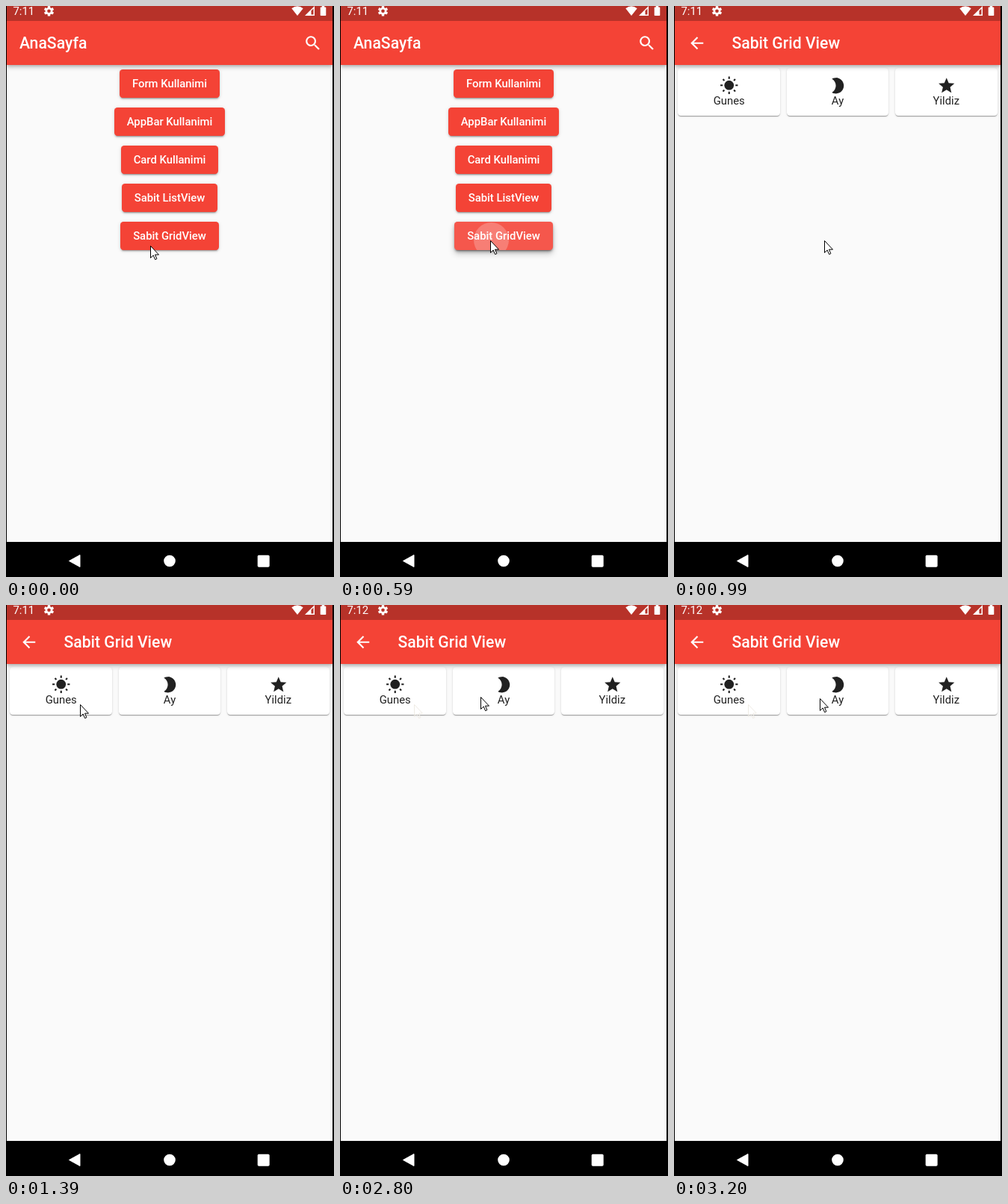
Recreate the animation shown at these times as an HTML page. Size 439 px wide and 765 px high, loop 3800 ms.

```html
<!DOCTYPE html>
<html lang="tr">
<head>
<meta charset="utf-8">
<title>Sabit Grid View</title>
<style>
  html, body { margin: 0; width: 100%; height: 100%; overflow: hidden; background: #000; }
  body { font: 14.85px/17.4px Roboto, sans-serif; }
  svg { display: block; fill: currentColor; }
  .stage { position: relative; width: 439px; height: 765px; overflow: hidden; background: #000; }
  .screen { position: absolute; left: 1px; top: 0; width: 436px; height: 718px; overflow: hidden; }
  .view { position: absolute; inset: 0; background: #fafafa; }
  .overlay { position: absolute; left: 0; top: 0; }

  .bar { position: absolute; left: 0; top: 0; width: 100%; height: 79px; background: #f44336; color: #fff;
    box-shadow: 0 2px 4px -1px #0003, 0 4px 5px #0002, 0 1px 10px #0001; }
  .bar b { position: absolute; top: 37px; font-weight: 500; font-size: 21.2px; line-height: 25px; white-space: nowrap; }
  .bar svg { position: absolute; top: 36.5px; }
  .status { position: absolute; left: 0; top: 0; width: 436px; height: 19.6px; background: #00000040; }
  .clock { position: absolute; left: 9.5px; top: -1px; color: #fff; }

  .buttons { position: absolute; top: 85.3px; width: 100%; display: flex; flex-direction: column; align-items: center; gap: 12.7px; }
  .btn { position: relative; height: 38.2px; padding: 0 17px; border-radius: 4.2px; background: #f44336; color: #fff;
    font-weight: 500; line-height: 38.2px; white-space: nowrap;
    box-shadow: 0 3px 1px -2px #0003, 0 2px 2px #0002, 0 1px 5px #0002; }
  .press { position: absolute; inset: 0; border-radius: inherit; overflow: hidden; background: #ffffff1c;
    box-shadow: 0 4px 5px -2px #0003, 0 5px 9px #0003; }
  .press::after { content: ""; position: absolute; left: 26px; top: 1.5px; width: 47px; height: 47px;
    border-radius: 50%; background: #ffffff3a; }

  .grid { position: absolute; top: 79px; width: 100%; display: grid; grid-template-columns: repeat(3, 1fr); }
  .card { margin: 4.24px; height: 64px; border-radius: 4.2px; background: #fff; color: #212121;
    display: flex; flex-direction: column; align-items: center; justify-content: center;
    box-shadow: 0 2px 1px -1px #0003, 0 1px 1px #0002, 0 1px 3px #0002; }
  .scrim { position: absolute; inset: 0; background: #00000080; }

  /* Hard cuts on a shared 3.8 s loop */
  .press, .scrim, .grid-page, .clock, .ghost, .ring, .cursor { animation: 3.8s step-end infinite; }
  .press { animation-name: press; }
  .scrim { animation-name: scrim; }
  .grid-page { animation-name: open; }
  .early { animation-name: early; }
  .late { animation-name: late; }
  .ghost { animation-name: ghost; }
  .ring { animation-name: ring; }
  .cursor { animation-name: move; }
  @keyframes press { 0% { opacity: 0 } 15.526% { opacity: 1 } 20.789%, 100% { opacity: 0 } }
  @keyframes scrim { 0% { opacity: 0 } 20.789% { opacity: 1 } 26.053%, 100% { opacity: 0 } }
  @keyframes open {
    0% { visibility: hidden; transform: scale(.9935) }
    20.789% { visibility: visible; transform: scale(.9935) }
    26.053%, 100% { visibility: visible; transform: none }
  }
  @keyframes early { 0% { opacity: 1 } 47.105%, 100% { opacity: 0 } }
  @keyframes late { 0% { opacity: 0 } 47.105%, 100% { opacity: 1 } }
  @keyframes ghost { 0% { opacity: 0 } 41.842%, 100% { opacity: 1 } }
  @keyframes ring {
    0% { opacity: 0 } 41.842% { opacity: 1 } 47.105% { opacity: 0 }
    78.947% { opacity: 1 } 84.211%, 100% { opacity: 0 }
  }
  @keyframes move {
    0% { transform: translate(193px, 321px) }
    5.263% { transform: translate(201px, 314px) }
    36.579% { transform: translate(99px, 133px) }
    41.842% { transform: translate(84px, 106px) }
    73.684% { transform: translate(188px, 123px) }
    78.947% { transform: translate(195px, 124px) }
    84.211%, 100% { transform: translate(195px, 125px) }
  }
</style>
</head>
<body>
<div class="stage">
  <div class="screen">
    <div class="view">
      <div class="buttons">
        <div class="btn">Form Kullanimi</div>
        <div class="btn">AppBar Kullanimi</div>
        <div class="btn">Card Kullanimi</div>
        <div class="btn">Sabit ListView</div>
        <div class="btn"><i class="press"></i>Sabit GridView</div>
      </div>
      <div class="bar">
        <b style="left:17px">AnaSayfa</b>
        <svg style="left:397px" width="25.5" height="25.5" viewBox="0 0 24 24">
          <path d="M15.5 14h-.79l-.28-.27A6.5 6.5 0 1 0 13.73 14.43l.27.28v.79l5 4.99L20.49 19zM9.5 14a4.5 4.5 0 1 1 0-9 4.5 4.5 0 0 1 0 9z"/>
        </svg>
      </div>
    </div>
    <div class="scrim"></div>
    <div class="view grid-page">
      <div class="grid">
        <div class="card">
          <svg width="25.5" height="25.5" viewBox="0 0 24 24">
            <circle cx="12" cy="11.5" r="6"/>
            <path stroke="currentColor" stroke-width="2" d="M12 .5v3M12 19.5v3M1 11.5h3M20 11.5h3M4.25 3.75l1.8 1.8M18 17.45l1.8 1.8M19.75 3.75l-1.8 1.8M6 17.45l-1.8 1.8"/>
          </svg>Gunes
        </div>
        <div class="card">
          <svg width="25.5" height="25.5" viewBox="0 0 24 24">
            <path d="M10 2a10 10 0 0 0-5 1.35 10 10 0 0 1 0 17.3A10 10 0 1 0 10 2z"/>
          </svg>Ay
        </div>
        <div class="card">
          <svg width="25.5" height="25.5" viewBox="0 0 24 24">
            <path d="M12 17.27L18.18 21l-1.64-7.03L22 9.24l-7.19-.61L12 2 9.19 8.63 2 9.24l5.46 4.73L5.82 21z"/>
          </svg>Yildiz
        </div>
      </div>
      <div class="bar">
        <svg style="left:17.2px" width="25.5" height="25.5" viewBox="0 0 24 24">
          <path d="M20 11H7.83l5.59-5.59L12 4l-8 8 8 8 1.41-1.41L7.83 13H20z"/>
        </svg>
        <b style="left:76.4px">Sabit Grid View</b>
      </div>
    </div>
    <div class="status"></div>
  </div>

  <span class="clock early">7:11</span>
  <span class="clock late">7:12</span>

  <svg class="overlay" width="439" height="765" color="#fff">
    <g transform="translate(57.5 6.8)">
      <circle r="4.9"/>
      <path id="tooth" stroke="#fff" stroke-width="3.4" d="M0-6.7V6.7"/>
      <use href="#tooth" transform="rotate(60)"/>
      <use href="#tooth" transform="rotate(120)"/>
      <circle r="2.3" fill="#b73228"/>
    </g>
    <path d="M390 13L382.3 3.3Q390-3 397.7 3.3z"/>
    <path d="M400 13L413 0V13z"/>
    <path fill="#b73228" d="M408.5 6.5L411.5 3.5V11.5H408.5z"/>
    <path d="M422.8 0h3.4v1.4h1.3q.8 0 .8.8V12.2q0 .8-.8.8h-6q-.8 0-.8-.8V2.200q0-.8.8-.8h1.300z"/>

    <path d="M84.5 743.5L99 735.5V751.5z" stroke="#fff" stroke-linejoin="round"/>
    <circle cx="219" cy="743.5" r="7.8"/>
    <rect x="336.700" y="735.700" width="16" height="16" rx="1.8"/>

    <path class="ghost" transform="translate(99 133)" fill="none" stroke="#eeebe4"
      d="M.5.5v16l3.700-3.500 2.400 5.700 2.300-1-2.400-5.500h5z"/>
    <g class="cursor">
      <circle class="ring" r="12" fill="#ff0" fill-opacity=".47"/>
      <path stroke="#000" d="M.5.5v16l3.700-3.500 2.400 5.700 2.300-1-2.400-5.500h5z"/>
    </g>
  </svg>
</div>
</body>
</html>
```
